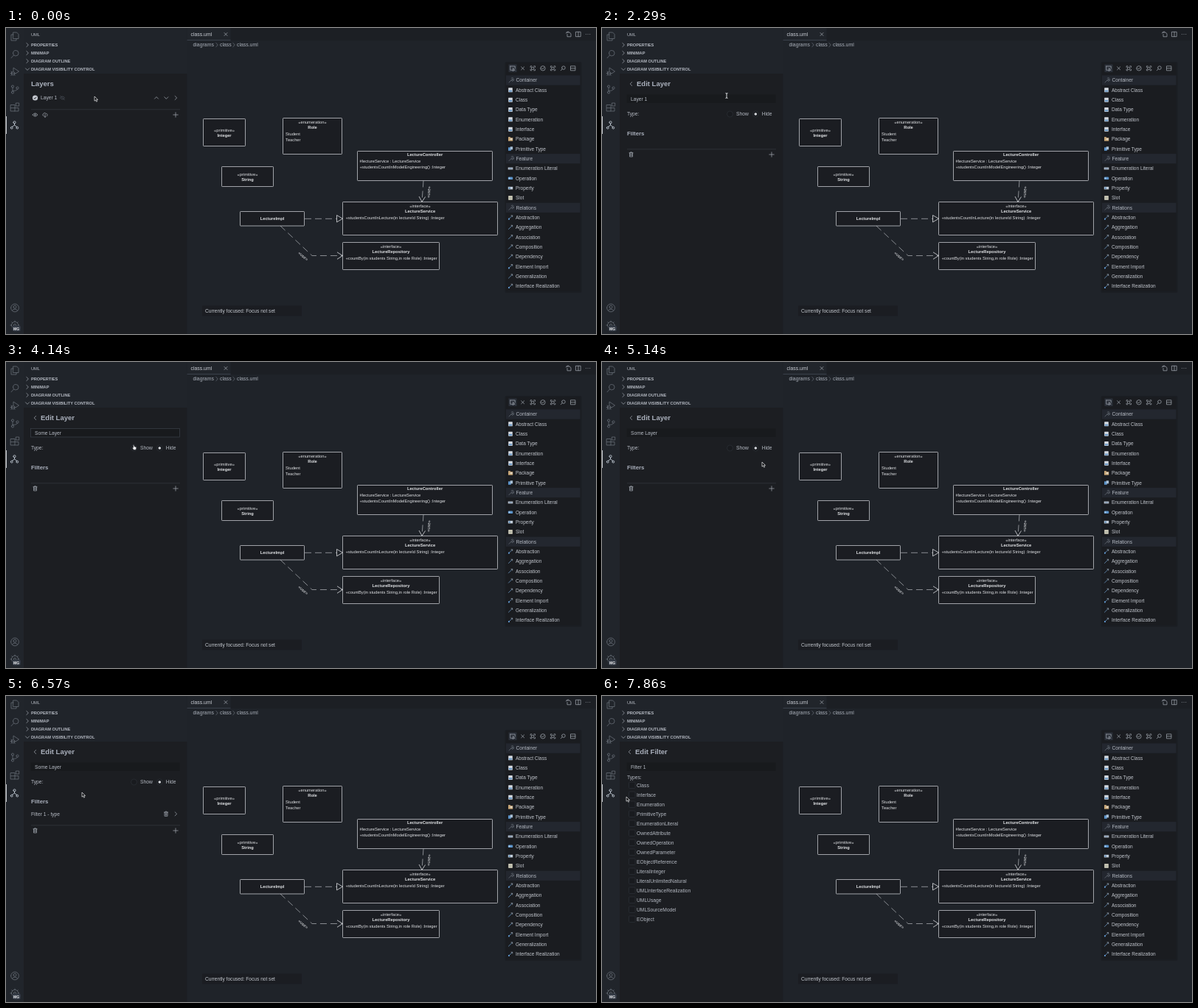
Animation of 800 by 416 pixels, one loop 8 s. Source, as an HTML page:

```html
<!DOCTYPE html>
<html lang="en">
<head>
<meta charset="utf-8">
<title>Layer editor</title>
<style>
  html, body { margin: 0; width: 100%; height: 100%; overflow: hidden; background: #1f2329; }
  svg { display: block; width: 100vw; height: 100vh; font-family: "Liberation Sans", Arial, sans-serif; }
  .line { fill: none; stroke: #9ea4ad; stroke-width: .75; stroke-linecap: round; stroke-linejoin: round; }
  .dim { stroke: #6a707a; }
  .faint { stroke: #4a505a; }
  .blue { stroke: #6f9cc8; }
  .box { fill: #1b1d22; stroke: #c2c5ca; stroke-width: .8; }
  .edge { fill: none; stroke: #c2c5ca; stroke-width: .65; }
  .tip { stroke: #dcdee1; stroke-width: .8; }
  .dash { stroke-dasharray: 9 5; }
  .hover { fill: #343942; }
</style>
</head>
<body>
<svg id="stage" viewBox="0 0 800 416" xmlns="http://www.w3.org/2000/svg"></svg>
<script>
const LOOP = 8000, FPS = 7;

// Drawing helpers
const rect = (x, y, w, h, fill, extra = '') =>
  `<rect x="${x}" y="${y}" width="${w}" height="${h}" fill="${fill}" ${extra}/>`;
const path = (d, cls = '') => `<path class="line ${cls}" d="${d}"/>`;
const at = (x, y, body, id = '') => `<g ${id && `id="${id}"`} transform="translate(${x} ${y})">${body}</g>`;
const group = (id, body) => `<g id="${id}">${body}</g>`;
const text = (x, y, str, size = 6.7, fill = '#b4b9c2', extra = '') =>
  `<text x="${x}" y="${(y + size * .36).toFixed(2)}" font-size="${size}" fill="${fill}" ${extra}>${str}</text>`;
const bold = (x, y, str, size, fill = '#b4b9c2') => text(x, y, str, size, fill, 'font-weight="700"');

const circle = (x, y, r) => `M${x - r} ${y}a${r} ${r} 0 1 0 ${2 * r} 0a${r} ${r} 0 1 0 ${-2 * r} 0`;
const icons = {
  right: 'M-1.2 -2.5L1.4 0L-1.2 2.5',
  left: 'M1.2 -2.5L-1.4 0L1.2 2.5',
  up: 'M-2.5 1.2L0 -1.4L2.5 1.2',
  down: 'M-2.5 -1.2L0 1.4L2.5 -1.2',
  plus: 'M-3.2 0H3.2M0 -3.2V3.2',
  close: 'M-2 -2L2 2M2 -2L-2 2',
  eye: 'M-3.5 0Q0 -4.4 3.5 0Q0 4.4 -3.5 0' + circle(0, 0, 1.1),
  eyeOff: 'M-3 0Q0 -4 3 0Q0 4 -3 0M-2.8 -2.8L2.8 2.8',
  cloud: 'M-2 1.5Q-4 1 -3 -.8Q-1 -4 1.3 -1.7Q4 -1.4 2.7 1.5M0 -.5V3.3M-1.2 2.1L0 3.3L1.2 2.1',
  trash: 'M-2.6 -2.2H2.6M-1 -2.2V-3.2H1V-2.2M-2 -2.2V3H2V-2.2M-.7 -.8V1.7M.7 -.8V1.7',
  files: 'M-2 -5.5H2.5L5 -3V3H-2ZM-2 -2.5H-5V5.5H2V3',
  search: circle(1.3, -1.3, 3.7) + 'M-1.3 1.3L-5 5.3',
  debug: 'M-2 -1V-5.5L5.5 -.5L1 2.5' + circle(-2.5, 2.2, 2.3) + 'M-5.8 2.2H.8M-5 -.5L-4 .8M-5 5L-4 3.8M0 5L-1 3.8',
  branch: circle(-3, -4, 1.6) + circle(-3, 4, 1.6) + circle(3.5, -2, 1.6) + 'M-3 -2.4V2.4M3.5 -.4Q3 2 -3 2',
  extensions: 'M-5.5 -3H0V5.5H-5.5ZM-5.5 1.2H5V5.5H0M1.7 -5.5H5.7V-1.5H1.7Z',
  tree: circle(0, -3.7, 1.6) + circle(-3.8, 3.7, 1.4) + circle(3.8, 3.7, 1.4) + 'M0 -2V0L-3.2 2.4M0 0L3.2 2.4',
  account: circle(0, 0, 5.4) + circle(0, -1.3, 2) + 'M-3.7 3.8Q0 -1 3.7 3.8',
  gear: circle(0, 0, 4.6) + circle(0, 0, 1.6) + 'M0 -6V-4.6M-6 0H-4.6M4.6 0H6M-4.2 -4.2L-3.2 -3.2M4.2 -4.2L3.2 -3.2',
  openFile: 'M-3 -2.5H1L3 -.8V3.3H-2V0M-3.5 -1.5Q-2 -4.5 0 -3.5',
  split: 'M-3.2 -3.2H3.2V3.2H-3.2ZM0 -3.2V3.2',
  more: 'M-2.7 0H-2.6M0 0H.1M2.7 0H2.8',
  marquee: 'M-3.2 -2.8H3.2V.3M-3.2 -2.8V2.5H0M.7 0L3 2.6H1.4L.7 3.5Z',
  fit: 'M-1.5 -1.5H1.5V1.5H-1.5ZM-3.2 -1.5V-3H-1.5M1.5 -3H3.2V-1.5M-3.2 1.5V3H-1.5M1.5 3H3.2V1.5',
  valid: circle(0, 0, 3.2) + 'M-1.4 0L-.3 1.2L1.6 -1.1',
  zoom: circle(.7, -.7, 2.3) + 'M-1 1L-3 3',
  collapse: 'M-3 -3H3V3H-3ZM-3 0H3',
  wrench: 'M-3 3L.3 -.3M.2 -2.8Q1.8 -4 2.8 -2.8L1 -1L2 0L3.4 -1.4Q4 1 1.5 1.3L0 0'
};
const icon = (name, x, y, cls = '', id = '') => at(x, y, path(icons[name], cls), id);

// Chrome around the editor
function workbench() {
  const bar = ['files', 'search', 'debug', 'branch', 'extensions'];
  const sections = ['PROPERTIES', 'MINIMAP', 'DIAGRAM OUTLINE', 'DIAGRAM VISIBILITY CONTROL'];
  const tab = '#c9cdd4', crumb = '#a9afb9';
  return rect(0, 0, 800, 416, '#1f2329') +
    rect(0, 0, 24, 416, '#21252b') + rect(24, 0, 221.5, 416, '#20242a') +
    rect(24, 62, 221.5, 354, '#1c1e22') +
    rect(245.5, 0, 555, 17, '#1c1f24') + rect(245.5, 0, 59, 17, '#21252b') +
    rect(245.5, 16.3, 59, .7, '#454c59') +
    bar.map((n, i) => icon(n, 12, 11.5 + i * 24, 'dim')).join('') +
    rect(0, 120, 1, 24, '#c8ccd2') + `<g style="filter:brightness(1.4)">${icon('tree', 11.5, 132)}</g>` +
    icon('account', 12, 380.5, 'dim') + icon('gear', 12, 404, 'dim') +
    rect(8.5, 404.5, 11.5, 8, '#333a45', 'rx="3"') + bold(10, 408.8, 'MG', 5, '#f0f1f3') +
    text(34, 9, 'UML', 5.7) +
    sections.map((s, i) => icon(i < 3 ? 'right' : 'down', 29, 23 + i * 11) +
      bold(34, 23 + i * 11, s, 5.65)).join('') +
    text(250.5, 9, 'class.uml', 6.9, tab) + icon('close', 298, 8.5) +
    text(253.5, 23, 'diagrams', 6.9, crumb) + icon('right', 286, 23, 'dim') +
    text(290, 23, 'class', 6.9, crumb) + icon('right', 309, 23, 'dim') +
    text(313, 23, 'class.uml', 6.9, crumb) +
    icon('openFile', 763, 8.5) + icon('split', 776, 8.5) + icon('more', 789, 8.5);
}

// UML diagram
function diagram() {
  const ink = '#e0e2e5', size = 5.75;
  const mid = (x, y, s, weight = 400) => text(x, y, s, size, ink, `text-anchor="middle" font-weight="${weight}"`);
  const node = (x, y, w, h, name, nameY, kind, kindY) =>
    `<rect class="box" x="${x}" y="${y}" width="${w}" height="${h}" rx=".7"/>` +
    (kind ? mid(x + w / 2, kindY, `«${kind}»`) : '') + mid(x + w / 2, nameY, name, 700);
  const member = (x, y, s) => text(x, y, s, size, ink);
  const edge = (d, cls = 'tip') => `<path class="edge ${cls}" d="${d}"/>`;
  const use = (x, y, angle) => `<g transform="translate(${x} ${y}) rotate(${angle})">${mid(0, 0, '«use»')}</g>`;
  return node(267.5, 123.5, 57, 37, 'Integer', 145.5, 'primitive', 139) +
    node(375.5, 122.5, 80, 49, 'Role', 134.7, 'enumeration', 128) +
    member(379, 143.7, 'Student') + member(379, 151.7, 'Teacher') +
    node(292.5, 188.5, 70, 27, 'String', 206, 'primitive', 198.7) +
    node(476.5, 167.5, 183, 40, 'LectureController', 172) +
    member(479.5, 180.7, '#lectureService : LectureService') +
    member(479.5, 189, '+studentsCountInModelEngineering() :Integer') +
    node(456.5, 236.5, 210, 45, 'LectureService', 248.7, 'interface', 241.7) +
    member(460.5, 257.5, '+studentsCountInLecture(in lectureId String) :Integer') +
    node(456.5, 291.5, 131, 37, 'LectureRepository', 303.7, 'interface', 297) +
    member(460.5, 312.7, '+countBy(in students String,in role Role) :Integer') +
    node(317.5, 249.5, 87, 19.5, 'LectureImpl', 259.3) +
    edge('M405 259.3H448.5', 'dash') + edge('M448.5 254.5L456.5 259.2L448.5 263.9Z') +
    edge('M372 269L415 309.5H456.5', 'dash') + edge('M449 304.8L456.5 309.5L449 314.3') +
    edge('M566 207.5L564 236.5', 'dash') + edge('M560 229L564 236.3L568.5 229.5') +
    use(573, 223, -86) + use(403, 310, 41) +
    rect(266, 377.5, 135, 14, '#1b1d22') + text(270, 385, 'Currently focused: Focus not set', 6.6, '#c3c7ce');
}

// Tool palette
function palette() {
  const groups = {
    Container: ['Abstract Class', 'Class', 'Data Type', 'Enumeration', 'Interface', 'Package', 'Primitive Type'],
    Feature: ['Enumeration Literal', 'Operation', 'Property', 'Slot'],
    Relations: ['Abstraction', 'Aggregation', 'Association', 'Composition', 'Dependency', 'Element Import',
      'Generalization', 'Interface Realization']
  };
  const doc = rect(-2.8, -3, 5.6, 6, '#d5dae0', 'rx=".4"') + rect(-2.2, .2, 4.4, 2.2, '#6f9cc8');
  const relation = path('M-2.6 2.6L2.6 -2.6', 'blue') + path('M1 -2.7H2.7V-1');
  const marked = relation + rect(-3, 1, 2, 2, '#5b8fc4');
  const special = {
    Package: rect(-3, -2.8, 3, 1.5, '#d0b184') + rect(-3, -1.8, 6.2, 4.5, '#c9a675') + rect(-.5, -1, 3.2, 2.2, '#dfd5c2'),
    'Primitive Type': rect(-3, -2, 3.8, 4.5, '#5b93c9') + rect(-.3, -3, 3.4, 4, '#a9c0d6'),
    'Enumeration Literal': rect(-3.3, -1.5, 6.6, 3, '#b6bdc6') + rect(-2.2, -.5, 4.4, 1, '#6f8fb0'),
    Operation: rect(-3.2, -1.8, 6.4, 3.6, '#5b93c9', 'rx="1.2"') + rect(-2.4, -1, 2, 2, '#a9c8e6'),
    Property: rect(-3.2, -1.8, 6.4, 3.6, '#c3cfdb') + rect(-2.4, -1, 2.2, 2, '#5686b4'),
    Slot: rect(-2.8, -2.8, 5.6, 5.6, '#d3d0bd') + rect(-1.8, -.3, 3.6, .8, '#7e8a80'),
    Abstraction: marked,
    'Element Import': marked,
    'Interface Realization': marked
  };
  const tools = ['marquee', 'close', 'fit', 'valid', 'fit', 'zoom', 'collapse'];
  let y = 71, rows = '';
  for (const [title, items] of Object.entries(groups)) {
    rows += rect(678, y - 6.6, 100.5, 13.2, '#23272f') + icon('wrench', 685, y, 'dim') + text(691.5, y, title, 6.6);
    y += 13.33;
    for (const item of items) {
      rows += at(684, y, special[item] || (title === 'Relations' ? relation : doc)) + text(691, y, item, 6.55, '#c0c4cb');
      y += 13.33;
    }
  }
  return rect(676.5, 46, 104, 314, '#191c20', 'opacity=".6" rx="2"') + rect(678, 47.5, 100.5, 310.5, '#1a1c20') +
    rect(681.5, 49.5, 11, 10.5, '#2b3039') +
    tools.map((n, i) => icon(n, 687 + i * 13.65, 54.8)).join('') + rows;
}

// Sidebar pages
const TITLE = '#aab0bc';
const rule = '<rect x="34" width="202" height=".7" fill="#34383f"/>';
const field = (id, y) => rect(33.5, y, 202, 11.5, '#181a1d', `id="${id}" stroke-width=".7"`);

function layersPage() {
  const row = (n, y) => `<circle cx="39.5" cy="${y}" r="3.6" fill="#c3c7ce"/>` +
    `<path d="M37.8 ${y}l1.2 1.3l2.1 -2.5" fill="none" stroke="#1c1e22" stroke-width=".9"/>` +
    text(47, y, `Layer ${n}`) + icon('eyeOff', 76.5, y, 'faint') +
    icon('up', 204, y) + icon('down', 217.3, y) + icon('right', 230.3, y);
  return bold(34, 76, 'Layers', 9.6, TITLE) + row(1, 95) +
    group('layer2', rect(199.5, 101.5, 9, 9, '', 'class="hover" id="hoverUp" rx="1"') + row(2, 106)) +
    at(0, 0, at(0, 110.5, rule) + icon('eye', 39.5, 118) + icon('cloud', 53, 118) + icon('plus', 230, 118), 'layersFoot');
}

function layerPage() {
  const radio = (x, label, id) => `<circle cx="${x}" cy="117" r="4" fill="#191b1f" stroke="#30343b" stroke-width=".6"/>` +
    `<circle id="${id}" cx="${x}" cy="117" r="1.8" fill="#d5d8dc"/>` + text(x + 8.5, 117, label);
  return icon('left', 39.5, 76) + bold(47, 76, 'Edit Layer', 9.5, TITLE) + field('nameField', 90.5) +
    rect(38.5, 92.5, 23, 8, '#3b4657', 'id="selection"') + text(39, 96.5, '', 6.7, '#b4b9c2', 'id="nameText"') +
    text(34, 117, 'Type:') + radio(173.5, 'Show', 'showDot') + radio(208.3, 'Hide', 'hideDot') +
    bold(34, 143, 'Filters', 7.8, TITLE) +
    group('filterRow', text(34, 160.5, 'Filter 1 - type') + icon('trash', 217, 160.3) + icon('right', 230.3, 160.3)) +
    at(0, 0, at(0, 164.5, rule) + rect(225.5, 167.5, 9.5, 9.5, '', 'class="hover" id="hoverPlus" rx="1"') +
      icon('trash', 39.5, 172) + icon('plus', 230, 172), 'filtersFoot');
}

function filterPage() {
  const types = ['Class', 'Interface', 'Enumeration', 'PrimitiveType', 'EnumerationLiteral', 'OwnedAttribute',
    'OwnedOperation', 'OwnedParameter', 'EObjectReference', 'LiteralInteger', 'LiteralUnlimitedNatural',
    'UMLInterfaceRealization', 'UMLUsage', 'UMLSourceModel', 'EObject'];
  return icon('left', 37.5, 76) + bold(45, 76, 'Edit Filter', 9.5, TITLE) + field('filterField', 90.5) +
    text(39, 96.5, 'Filter 1') + text(34, 111, 'Types:') +
    types.map((t, i) => rect(36.5, 117 + i * 13, 8.5, 8.5, '#191b1f', 'stroke="#30343b" stroke-width=".6" rx="1"') +
      text(47, 121.3 + i * 13, t)).join('');
}

const pointers = {
  arrow: '<path d="M0 0V6.2L1.5 4.9L2.6 7.2L3.7 6.7L2.6 4.4H4.5Z" fill="#0b0c0e" stroke="#f0f1f3" stroke-width=".7"/>',
  hand: '<path d="M-1.7 -3.2Q-.8 -4 -.4 -2.8L0 -1.2L2.3 -.5Q3 0 2.7 1.5L2 3.4H-1L-2.6 .9Q-2.8 0 -1.4 .3Z" fill="#f0f1f3" stroke="#101216" stroke-width=".5"/>',
  beam: '<path d="M-1.5 -3.5Q0 -3.5 0 -2.4Q0 -3.5 1.5 -3.5M0 -2.8V2.8M-1.5 3.5Q0 3.5 0 2.4Q0 3.5 1.5 3.5" fill="none" stroke="#e6e8eb" stroke-width=".9"/>'
};

const stage = document.getElementById('stage');
stage.innerHTML = workbench() + group('layers', layersPage()) + group('layer', layerPage()) +
  group('filter', filterPage()) + diagram() + palette() +
  group('cursor', Object.entries(pointers).map(([id, body]) => group(id, body)).join(''));

// Pointer route: step, x, y, shape
const route = [
  [0, 120, 93, 'arrow'], [1, 150, 99, 'arrow'], [3, 231, 119, 'hand'], [4, 231, 119, 'hand'], [6, 204, 107.3, 'hand'],
  [8, 204, 107, 'hand'], [10, 231, 96, 'hand'], [12, 231, 96, 'arrow'], [14, 190, 93, 'beam'], [16, 169, 92, 'beam'],
  [18, 76, 97, 'beam'], [21, 22, 97, 'beam'], [27, 22, 97, 'arrow'], [29, 174, 116, 'hand'], [31, 174, 116, 'hand'],
  [33, 209, 117, 'hand'], [35, 209, 117, 'arrow'], [38, 233, 174, 'hand'], [42, 233, 174, 'arrow'], [46, 103, 131, 'arrow'],
  [47, 126, 139, 'arrow'], [49, 231, 162, 'hand'], [51, 231, 162, 'arrow'], [54, 45, 138, 'arrow'], [55, 33, 137, 'arrow']
];
const typed = ['S', 'So', 'Some', 'Some L', 'Some Lay', 'Some Layer'];
const el = id => document.getElementById(id);
const show = (id, on) => el(id).setAttribute('visibility', on ? 'inherit' : 'hidden');
const within = (k, from, to) => k >= from && k < to;

function render(k) {
  show('layers', k < 12);
  show('layer', within(k, 12, 51));
  show('filter', k >= 51);

  show('layer2', k >= 4);
  show('hoverUp', within(k, 6, 9));
  el('layersFoot').setAttribute('transform', `translate(0 ${k >= 4 ? 11 : 0})`);

  el('nameText').textContent = k < 22 ? 'Layer 1' : typed[Math.min(k - 22, typed.length - 1)];
  el('nameField').setAttribute('stroke', within(k, 18, 30) ? '#3b4049' : 'none');
  show('selection', within(k, 20, 22));
  const shown = within(k, 30, 34);
  show('showDot', shown);
  show('hideDot', !shown);
  show('filterRow', k >= 41);
  show('hoverPlus', within(k, 38, 41));
  el('filtersFoot').setAttribute('transform', `translate(0 ${k >= 41 ? 11 : 0})`);

  const i = route.findLastIndex(r => r[0] <= k);
  const [k0, x0, y0, shape] = route[i];
  const [k1, x1, y1] = route[i + 1] || [k0 + 1, x0, y0];
  const p = (k - k0) / (k1 - k0);
  el('cursor').setAttribute('transform', `translate(${x0 + (x1 - x0) * p} ${y0 + (y1 - y0) * p})`);
  for (const id in pointers) show(id, id === shape);
  show('cursor', !within(k, 22, 27));
}

const start = performance.now();
let last = -1;
function tick() {
  const time = (performance.now() - start) % LOOP;
  const step = Math.floor((time + 6) * FPS / 1000) % (LOOP * FPS / 1000);
  if (step !== last) render(last = step);
  requestAnimationFrame(tick);
}
tick();
</script>
</body>
</html>
```
